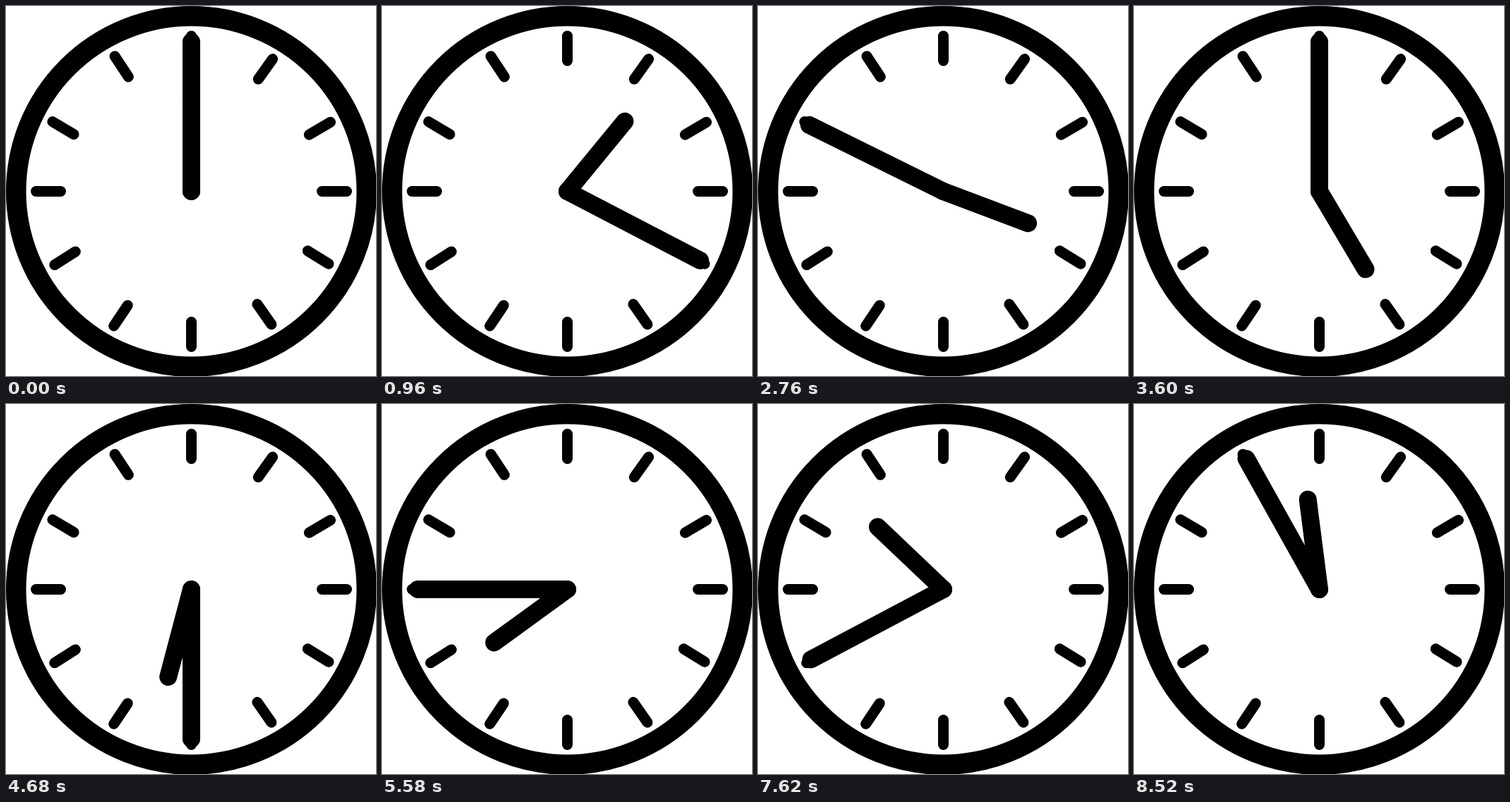
Animation of 524x524 px, one loop 8580 ms. Source, as an HTML page with a canvas:

```html
<!DOCTYPE html>
<html lang="en">
<head>
<meta charset="utf-8">
<title>Clock</title>
<style>
  html, body { margin: 0; width: 100%; height: 100%; overflow: hidden; background: #fff; }
  canvas { display: block; width: 524px; height: 524px; }
</style>
</head>
<body>
<canvas id="clock" width="524" height="524"></canvas>
<script>
const ctx = document.getElementById('clock').getContext('2d');
const SIZE = 524, MID = 262.5;
const STEP = 60, STEPS = 143, SKIPPED = 120;
const RAD = Math.PI / 180;

// The dial is drawn by hand: degrees by which each hour mark strays
const stray = [0, 1.2, 3.9, 0, -2.5, -0.7, 0, -0.4, 2.1, 0, -3.7, 0.8];
const markAngle = i => 30 * i + stray[i % 12];

// Point at a distance from (x, y), clockwise from 12 o'clock
function polar(degrees, radius, x = MID, y = MID) {
  return [x + radius * Math.sin(degrees * RAD), y - radius * Math.cos(degrees * RAD)];
}

function line(from, to, width) {
  ctx.lineWidth = width;
  ctx.beginPath();
  ctx.moveTo(...from);
  ctx.lineTo(...to);
  ctx.stroke();
}

function mark(i) {
  const angle = markAngle(i);
  const lean = angle + 5 * Math.sin(120 * i * RAD);
  const middle = polar(angle, 202.5);
  line(polar(lean, -17.5, ...middle), polar(lean, 17.5, ...middle), 15);
}

function hand(degrees, length) {
  line([MID, MID], polar(degrees, length), 25);
}

// The hour hand moves on once every quarter of an hour
function hourAngle(minutes) {
  const hour = Math.floor(minutes / 60);
  const part = Math.floor(minutes % 60 / 15) / 4;
  return markAngle(hour) + (markAngle(hour + 1) - markAngle(hour)) * part;
}

function draw(step) {
  // One five-minute position is left out of each turn
  const minutes = 5 * (step < SKIPPED ? step : step + 1);
  ctx.fillStyle = '#fff';
  ctx.fillRect(0, 0, SIZE, SIZE);
  ctx.strokeStyle = '#000';
  ctx.lineCap = 'round';
  ctx.lineWidth = 28.5;
  ctx.beginPath();
  ctx.arc(MID, MID, 248.25, 0, Math.PI * 2);
  ctx.stroke();
  for (let i = 0; i < 12; i++) mark(i);
  hand(markAngle(minutes % 60 / 5), 212);
  hand(hourAngle(minutes), 128.3);
}

const start = performance.now();
function tick(now) {
  const elapsed = Math.max(0, now - start);
  draw(Math.floor(elapsed / STEP) % STEPS);
  requestAnimationFrame(tick);
}
draw(0);
requestAnimationFrame(tick);
</script>
</body>
</html>
```
